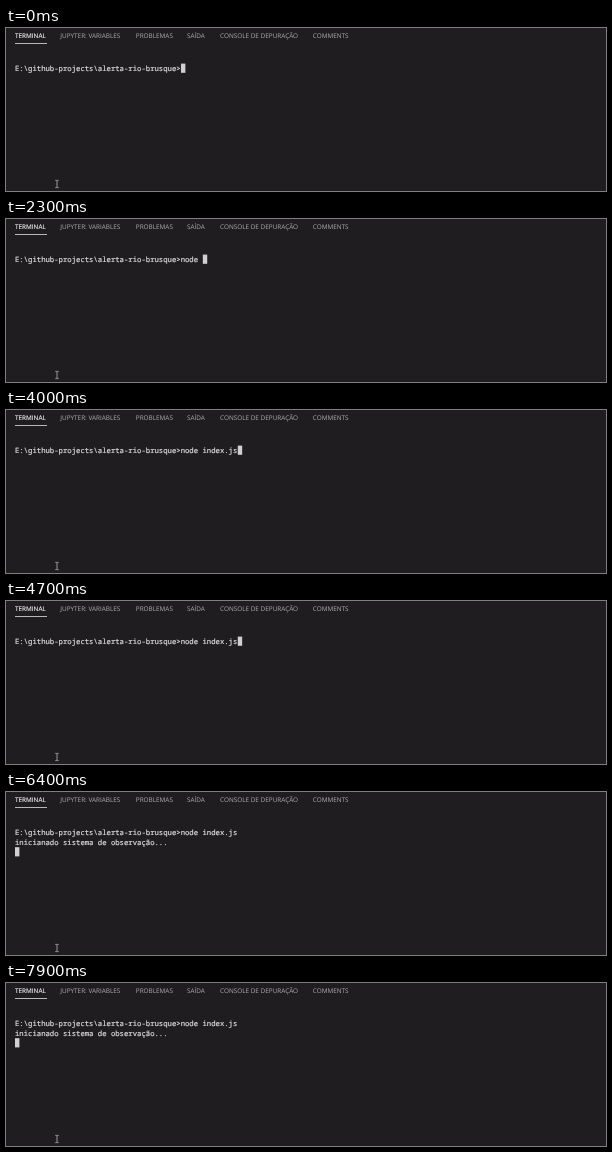
An HTML page that plays this animation: 600 px wide and 163 px high, repeating every 8 s.

```html
<!DOCTYPE html>
<html lang="pt">
<head>
<meta charset="utf-8">
<style>
  html, body { margin: 0; width: 100%; height: 100%; overflow: hidden; background: #1f1d20; }
  svg { display: block; width: 600px; height: 163px; }
  text { white-space: pre; text-rendering: geometricPrecision; }
  .tabs { font: 6.4px "Open Sans", "Noto Sans", sans-serif; fill: #adadad; }
  .tabs .active { fill: #f4f4f4; stroke: #f4f4f4; stroke-width: 0.12; }
  .term { font: 7.28px "Noto Sans Mono", "DejaVu Sans Mono", monospace; fill: #dcdcdc; stroke: #dcdcdc; stroke-width: 0.2; }
</style>
</head>
<body>
<svg viewBox="0 0 600 163">
  <rect width="600" height="163" fill="#1f1d20"/>
  <g class="tabs">
    <text class="active" x="9" y="10.2">TERMINAL</text>
    <text x="54.3" y="10.2">JUPYTER: VARIABLES</text>
    <text x="129.8" y="10.2">PROBLEMAS</text>
    <text x="181" y="10.2">SAÍDA</text>
    <text x="214" y="10.2">CONSOLE DE DEPURAÇÃO</text>
    <text x="306.8" y="10.2">COMMENTS</text>
  </g>
  <rect x="9" y="15" width="32" height="1" fill="#b8b8b8"/>
  <g class="term">
    <text id="command" x="9" y="43"></text>
    <text id="output" x="9" y="52.8">inicianado sistema de observação...</text>
  </g>
  <rect id="cursor" width="4.4" height="9.2" fill="#d0d0d0"/>
  <path d="M49.3 152.4h1.2l.5.4.5-.4h1.2M51 152.8v6.4M49.3 159.6h1.2l.5-.4.5.4h1.2"
        fill="none" stroke="#d0d0d0" stroke-width="0.7"/>
</svg>
<script>
  const LOOP = 8000, LEFT = 9, CELL = 4.368, LINE = 9.8;
  const PROMPT = "E:\\github-projects\\alerta-rio-brusque>";
  const TYPED = "node index.js";
  // Key presses; the file name is then completed at once.
  const KEYS = [1300, 1600, 1800, 2000, 2300, 2700, 3000];
  const COMPLETE = 3400, ENTER = 5500, PRINT = 5800;

  const command = document.getElementById("command");
  const output = document.getElementById("output");
  const cursor = document.getElementById("cursor");

  function render(t) {
    const count = t >= COMPLETE ? TYPED.length : KEYS.filter(k => t >= k).length;
    const row = t >= PRINT ? 2 : t >= ENTER ? 1 : 0;
    const column = row ? 0 : PROMPT.length + count;
    const line = PROMPT + TYPED.slice(0, count);
    if (command.textContent !== line) command.textContent = line;
    output.setAttribute("visibility", row === 2 ? "visible" : "hidden");
    cursor.setAttribute("x", LEFT + column * CELL);
    cursor.setAttribute("y", 35.6 + row * LINE);
  }

  const start = performance.now();
  function tick() {
    render((performance.now() - start) % LOOP);
    requestAnimationFrame(tick);
  }
  tick();
</script>
</body>
</html>
```
